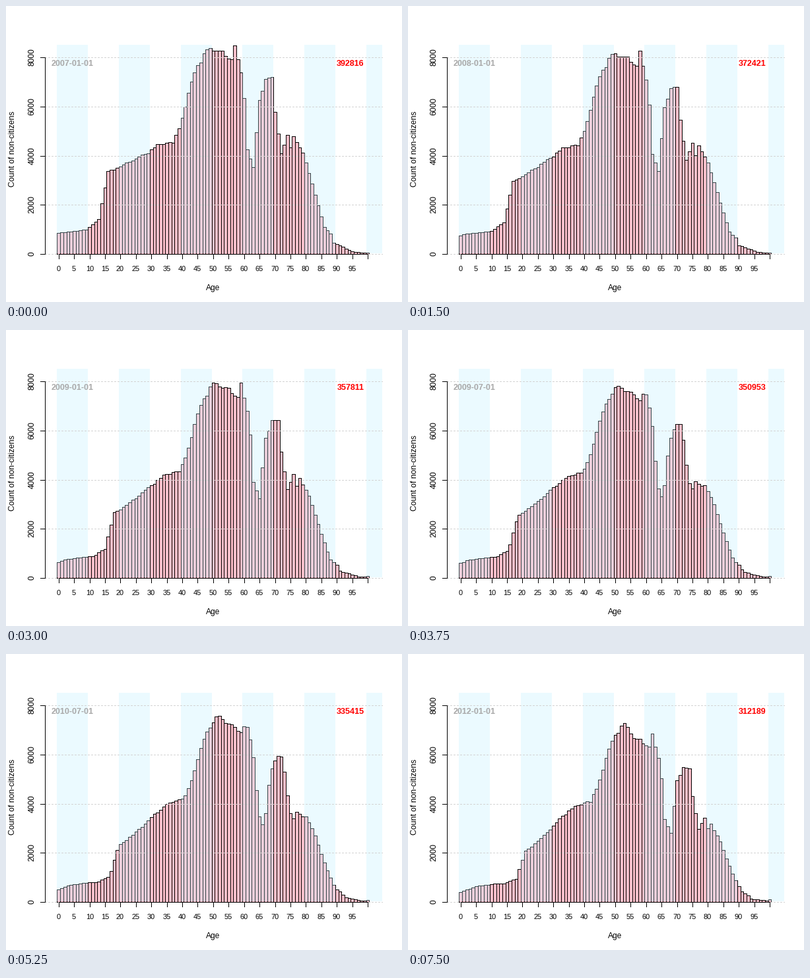
Recreate the animation shown at these times as a matplotlib script. Size 600 by 450 pixels, loop 8000 ms.

```python
import numpy as np
import matplotlib.pyplot as plt
from matplotlib.animation import FuncAnimation
from matplotlib.patches import Rectangle

W, H, DPI = 600, 450, 72
LEFT, TOP, RIGHT, BASE = 59, 59, 570, 376
X0, BAR_W = 77.96, 4.682          # left edge of age 0, width of one year
Y0, UNIT = 376.56, 0.0373341      # zero line, pixels per person
DX, DY = .25, .75                 # offsets that snap a line onto its pixel
FRAMES, INTERVAL, HOLD, STEPS = 32, 250, 3, 10
PEAK = 8505

# Turning points of the starting age curve; negative ages are births to come
SHAPE = [(-5, 556), (0, 860), (9, 990), (13, 1420), (16, 3350), (22, 3690),
         (29, 4130), (32, 4450), (37, 4560), (39, 5130), (44, 7420),
         (48, 8330), (52, 8300), (56, 7850), (57, PEAK), (59, 7410),
         (60, 6300), (61, 4290), (63, 3510), (65, 6300), (67, 7080),
         (69, 7240), (70, 5790), (72, 4080), (74, 4830), (75, 4380),
         (76, 4780), (79, 4130), (83, 2440), (86, 1100), (88, 830),
         (89, 460), (95, 110), (100, 30)]
# Share of a cohort left after five years, by starting age
KEEP = [(-5, .72), (7, .79), (16, .615), (28, .86), (38, .905), (48, .875),
        (51, .805), (65, .79), (74, .71), (79, .6), (89, .3)]
# Positive: the loss comes early; negative: it comes late
BEND = [(-5, 0), (22, .45), (45, 0), (52, -.45), (65, 0)]
# Years since the start and the count shown
TOTAL = [(0, 392816), (.5, 381290), (1, 372421), (2, 357811), (3, 344095),
         (4, 326735), (5, 312189)]


def along(points, x):
    return np.interp(x, *zip(*points))


START_AGE = np.arange(-5, 101)
NOISE = np.random.default_rng(4).uniform(-.01, .01, START_AGE.size)
COHORT = along(SHAPE, START_AGE) * (1 + NOISE)
LASTING = along(KEEP, START_AGE)
EARLY = along(BEND, START_AGE)


def counts(year):
    """People at each age from 0 to 100, some years after the start."""
    s = year / 5
    left = COHORT * LASTING ** (s + EARLY * s * (1 - s))
    ages = np.interp(np.arange(101) - year, START_AGE, left)
    ages[100] = 50 + 12 * year    # everyone of 100 and over
    return np.minimum(ages, PEAK)


def px(age):
    return int(X0 + BAR_W * age)


def py(count):
    return int(Y0 - UNIT * count)


fig = plt.figure(figsize=(W / DPI, H / DPI), dpi=DPI, facecolor="white")
ax = fig.add_axes([0, 0, 1, 1])
ax.set(xlim=(0, W), ylim=(H, 0))
ax.axis("off")


def line(x1, y1, x2, y2, color="black", z=5, style="-"):
    ax.plot([x1 + DX, x2 + DX], [y1 + DY, y2 + DY], color=color, lw=1,
            ls=style, antialiased=False, solid_capstyle="projecting",
            dash_capstyle="butt", zorder=z)


def label(x, y, text, size=12, **kw):
    return ax.text(x, y, text, fontsize=size, family="Liberation Sans",
                   ha="center", va="baseline", rotation_mode="anchor",
                   zorder=6, **kw)


bars = []
for age in range(101):
    x = px(age)
    bar = Rectangle((x + DX, BASE + DY), px(age + 1) - x, 0, facecolor="pink",
                    edgecolor="black", lw=1, antialiased=False, zorder=2)
    bars.append(ax.add_patch(bar))

for age in range(0, 101, 20):
    x, end = px(age), min(px(age + 10), RIGHT)
    ax.add_patch(Rectangle((x, TOP), end - x, BASE - TOP, lw=0, alpha=.3,
                           facecolor="#bfefff", antialiased=False, zorder=3))

for count in range(0, 8001, 2000):
    y = py(count)
    line(LEFT, y, RIGHT, y, "lightgray", 4, (0, (2, 2)))
    line(LEFT - 7, y, LEFT, y)
    label(42.5, y + .5, str(count), rotation=90)
line(LEFT, py(8000), LEFT, BASE)

for age in range(0, 101, 5):
    x = px(age + .5)
    line(x, BASE, x, BASE + 7)
    if age < 100:
        label(x, 403, str(age), 11)
line(px(.5), BASE, px(100.5), BASE)

label(313.5, 432, "Age")
label(13.5, 217.5, "Count of non-citizens", 12.2, rotation=90)
date = label(101, 91, "", 12.5, weight="bold", color="darkgray")
total = label(522, 91, "", 12.5, weight="bold", color="red")


def draw(frame):
    step = min(frame // HOLD, STEPS)
    year = step / 2
    for bar, count in zip(bars, counts(year)):
        top = py(count)
        bar.set_y(top + DY)
        bar.set_height(BASE - top)
    date.set_text(f"{2007 + step // 2}-{1 + 6 * (step % 2):02d}-01")
    total.set_text(f"{along(TOTAL, year):.0f}")
    return [*bars, date, total]


anim = FuncAnimation(fig, draw, frames=FRAMES, interval=INTERVAL,
                     repeat=True, repeat_delay=0, blit=False)
plt.show()
```
